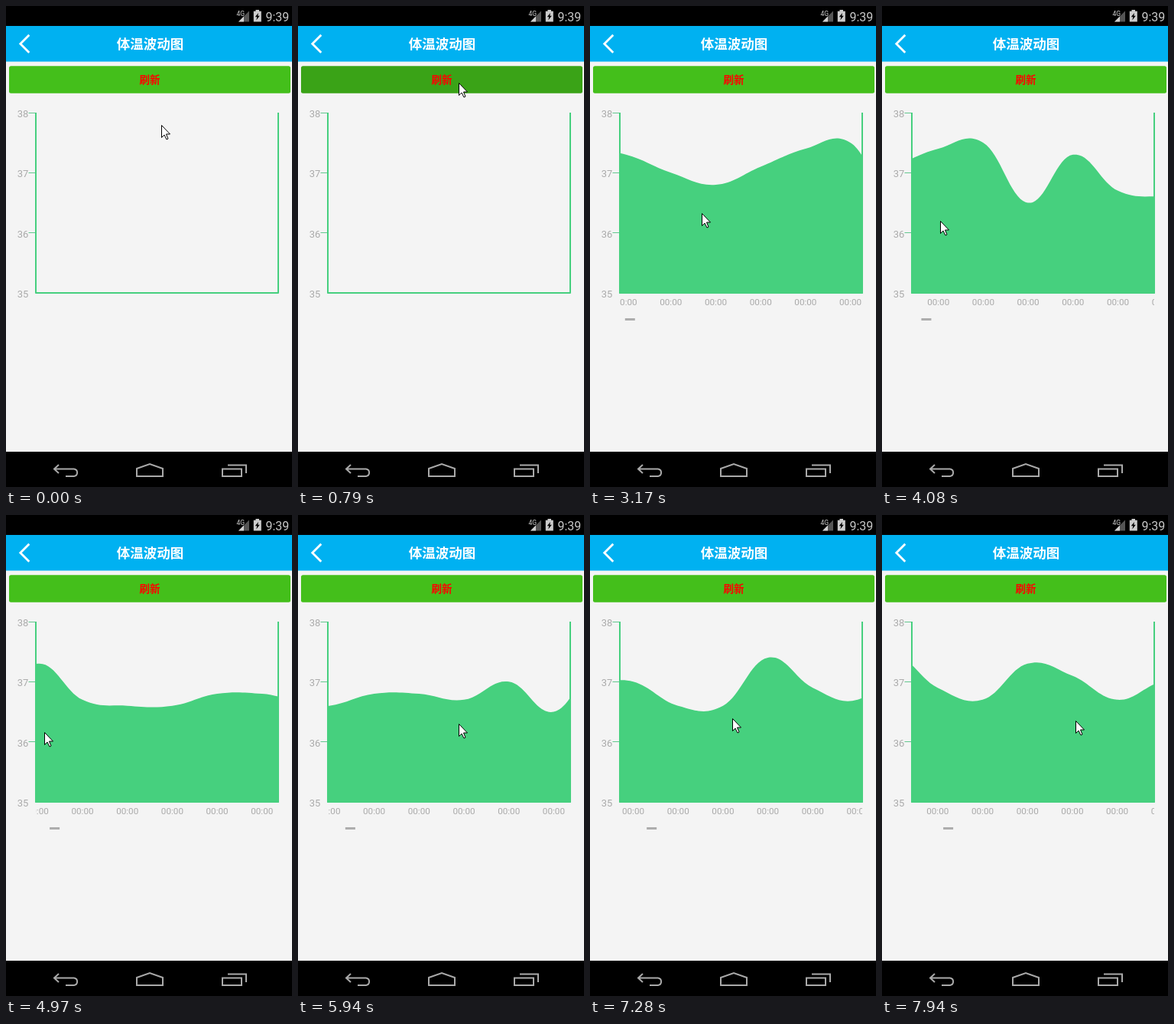
An HTML page that plays this animation: 374 by 627 pixels, repeating every 8000 ms.

```html
<!DOCTYPE html>
<html lang="zh">
<head>
<meta charset="utf-8">
<title>体温波动图</title>
<style>
html, body { margin: 0; width: 100%; height: 100%; overflow: hidden; background: #f4f4f4; }
svg { display: block; width: 374px; height: 627px; font-family: Roboto, "Noto Sans CJK SC", "Noto Sans CJK", sans-serif; }
.cjk { font-family: "Noto Sans CJK SC", "Noto Sans CJK", sans-serif; font-weight: 700; text-anchor: middle; }
.axis { fill: none; stroke: #46cf7e; stroke-width: 2; stroke-linejoin: round; }
.tick { stroke: #64c78f; stroke-width: 1; }
.y { font-size: 13px; fill: #aaa; text-anchor: end; }
.x { font-size: 11.7px; fill: #aaa; text-anchor: middle; }
.nav { fill: none; stroke: #a9a9a9; stroke-width: 2; }
</style>
</head>
<body>
<svg viewBox="0 0 374 627">
  <defs>
    <clipPath id="view"><rect x="38" y="130" width="319" height="245" rx="1.5"/></clipPath>
    <clipPath id="names"><rect x="39" y="376" width="317" height="24"/></clipPath>
  </defs>
  <rect width="374" height="627" fill="#f4f4f4"/>

  <rect width="374" height="26" fill="#000"/>
  <text x="301.5" y="13" font-size="8.5" fill="#ccc">4G</text>
  <path d="M304 20.5L318 6.5V20.5Z" fill="#555"/>
  <path d="M304 20.5L311 13.5V20.5Z" fill="#d0d0d0"/>
  <path d="M326.5 5H331V6.8H333.8V20.5H323.8V6.8H326.5Z" fill="#ccc"/>
  <path d="M330 9L325.8 14.3H328.3L327.3 18.5L331.8 12.8H329.3Z" fill="#000"/>
  <text x="339.5" y="19.5" font-size="16" fill="#c8c8c8">9:39</text>

  <rect y="26" width="374" height="46.5" fill="#00b1f1"/>
  <path d="M30.3 37.7L18.8 49.2L30.3 60.7" fill="none" stroke="#fff" stroke-width="2.8"/>
  <text class="cjk" x="188.5" y="55.5" font-size="17.5" fill="#fff">体温波动图</text>

  <rect id="button" x="4" y="78.3" width="368" height="35.5" rx="2.5" fill="#44bf1b"/>
  <text class="cjk" x="188" y="101.3" font-size="13.5" fill="#f00">刷新</text>

  <g id="scale"></g>
  <path class="axis" d="M39 139V374H356V139"/>

  <g id="chart">
    <g clip-path="url(#view)"><path id="area" fill="#46d07e"/></g>
    <g clip-path="url(#names)"><g id="labels"></g></g>
    <rect id="thumb" y="407" width="13" height="3" fill="#adadad"/>
  </g>

  <rect y="581" width="374" height="46" fill="#000"/>
  <path class="nav" d="M69 598L63 603.5L69 609M63 603.5H89A4.8 4.8 0 0 1 89 613H78"/>
  <path class="nav" d="M171 613V603L188 597L205 603V613Z"/>
  <path class="nav" d="M283 603.5H308V613H283ZM290 598.5H314V609"/>

  <path id="cursor" d="M0 0V16L3.5 12.5L6.5 18.5L8.5 17.5L6 11.5H11Z" fill="#fff" stroke="#000"/>
</svg>
<script>
const LOOP = 8000, STEP = 133, GAP = 58.7, LEFT = 59, TOP = 139, DEGREE = 235 / 3, BASE = 375;

// Tenths of a degree above 36, one digit per reading; 10 and up as letters.
const temps = [..."eeda8bef5d766887a5daa66e97db7aa8"].map(c => 36 + parseInt(c, 16) / 10);

// Each drag scrolls the chart: start, end, from x, to x, y.
const drags = [
  [2760, 3410, 275, 70, 270],
  [3820, 4080, 208.5, 76, 280],
  [4527, 4970, 258.5, 50, 283],
  [5230, 5580, 226.5, 50, 274],
  [5960, 6240, 222, 45, 272],
  [6620, 6980, 304, 27, 259],
  [7400, 7670, 249.5, 31, 268]
];
const route = [
  [120, 203, 155], [790, 210, 100], [2120, 210, 100],
  ...drags.flatMap(([a, b, x0, x1, y]) => [[a, x0, y], [b, x1, y]]),
  [7940, 253, 268]
];
// The screen redraws in even steps between these moments.
const marks = [0, 120, 790, 1750, 2120, 3170, 4080, 4970, 6620, 7940];

const el = id => document.getElementById(id);
const clamp = (v, lo, hi) => Math.max(lo, Math.min(hi, v));
const part = (t, a, b) => clamp((t - a) / (b - a), 0, 1);
const yOf = temp => TOP + (38 - temp) * DEGREE;
const at = i => {
  const k = clamp(i, 0, temps.length - 1);
  return [LEFT + k * GAP, yOf(temps[k])];
};

function areaPath() {
  const bend = (i, sign) => at(i).map((v, axis) =>
    (v + sign * 0.2 * (at(i + 1)[axis] - at(i - 1)[axis])).toFixed(2));
  let d = `M${LEFT} ${BASE}L${at(0)}`;
  for (let i = 1; i < temps.length; i++)
    d += `C${bend(i - 1, 1)} ${bend(i, -1)} ${at(i)}`;
  return d + `V${BASE}Z`;
}

el("area").setAttribute("d", areaPath());
el("labels").innerHTML = temps.map((_, i) =>
  `<text class="x" x="${at(i)[0]}" y="390">00:00</text>`).join("");
el("scale").innerHTML = [38, 37, 36, 35].map(v => {
  const y = yOf(v);
  const tick = v > 35 ? `<path class="tick" d="M29.5 ${Math.floor(y) + 0.5}H39"/>` : "";
  return `<text class="y" x="29.3" y="${Math.round(y + 6)}">${v}</text>${tick}`;
}).join("");

function held(time) {
  const i = marks.findIndex(m => m > time);
  if (i < 0) return marks[marks.length - 1];
  const a = marks[i - 1], span = marks[i] - a;
  const step = span / Math.max(1, Math.round(span / STEP));
  return a + Math.floor((time - a) / step + 0.001) * step;
}

function pointer(t) {
  const i = Math.max(1, route.findIndex(p => p[0] >= t));
  const [a, x0, y0] = route[i - 1], [b, x1, y1] = route[i];
  const k = part(t, a, b);
  return [x0 + (x1 - x0) * k, y0 + (y1 - y0) * k].map(v => Math.round(v) + 0.5);
}

const scrollAt = t => drags.reduce((sum, [a, b, x0, x1]) =>
  sum + (x0 - x1) * part(t, a, b), 0);

function draw(now) {
  const t = held(now % LOOP);
  const scroll = scrollAt(t);
  const shift = `translate(${-scroll.toFixed(2)} 0)`;
  el("cursor").setAttribute("transform", `translate(${pointer(t)})`);
  el("area").setAttribute("transform", shift);
  el("labels").setAttribute("transform", shift);
  el("thumb").setAttribute("x", (42.3 + scroll / 36.9).toFixed(2));
  el("thumb").style.display = scroll > 0 ? "" : "none";
  el("chart").style.display = t >= 1750 ? "" : "none";
  el("button").setAttribute("fill", t >= 790 && t < 1750 ? "#3aa317" : "#44bf1b");
}

const start = performance.now();
function tick() {
  draw(performance.now() - start);
  requestAnimationFrame(tick);
}
tick();
</script>
</body>
</html>
```
